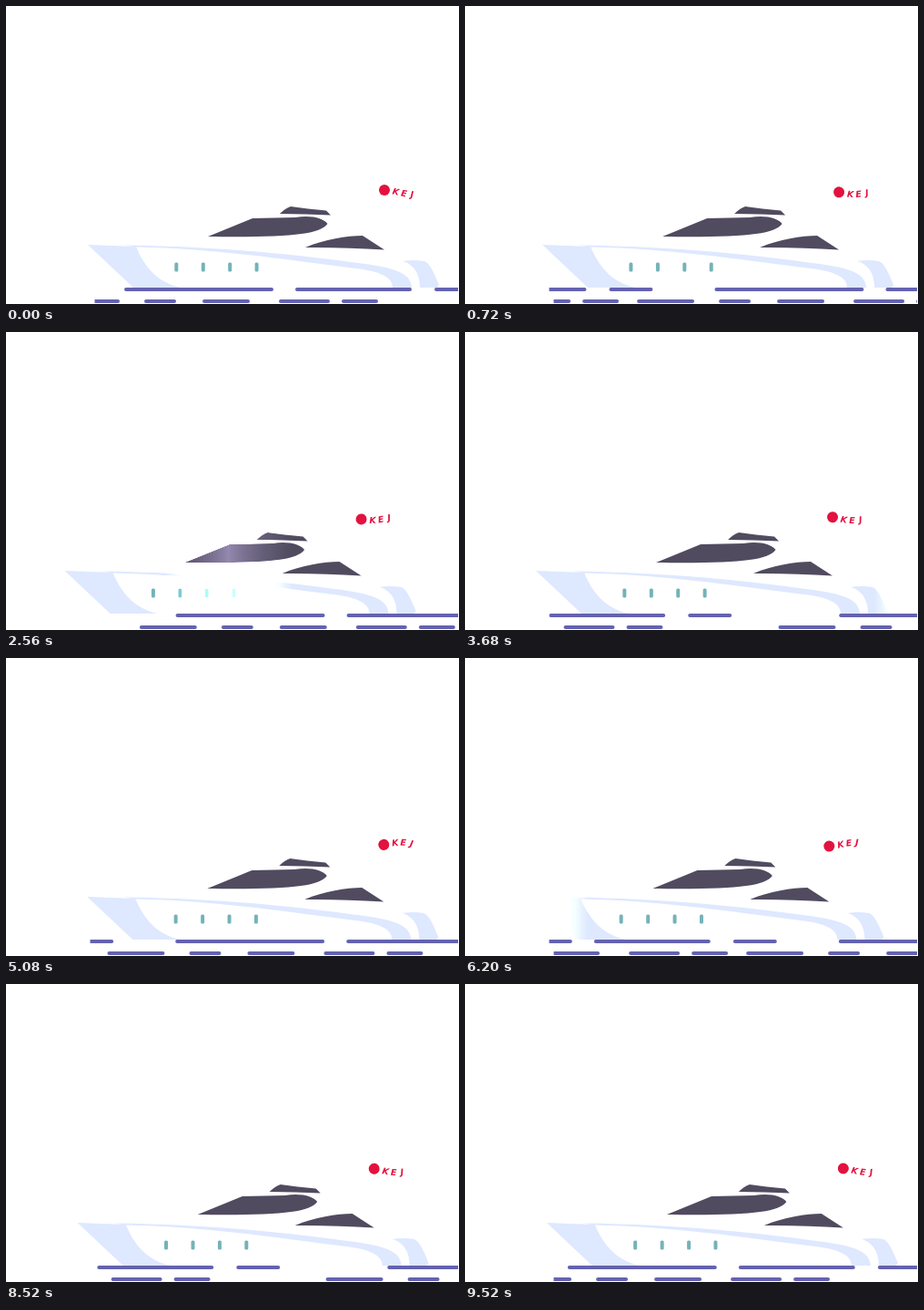
Recreate the animation shown at these times as an HTML page. Size 498 px wide and 327 px high, loop 9.56 s.

```html
<!DOCTYPE html>
<html lang="en">
<head>
<meta charset="utf-8">
<title>Yacht</title>
<style>
  html, body { margin: 0; width: 100%; height: 100%; overflow: hidden; background: #fff; }
  svg { display: block; width: 498px; height: 327px; }
  .scene { isolation: isolate; }
  .shine { mix-blend-mode: color-dodge; }
  .hull { fill: #dee8ff; }
  .glass { fill: #514b60; }
  .port { fill: #74b3b8; }
  .water { stroke: #6462b0; stroke-width: 4; stroke-linecap: round; }
  .flag { fill: #e3123f; font: italic bold 9.5px "DejaVu Sans", sans-serif; text-anchor: middle; }
</style>
</head>
<body>
<svg viewBox="0 0 498 327">
  <defs>
    <linearGradient id="glow">
      <stop offset="0" stop-color="#000"/>
      <stop offset=".5" stop-color="#737373"/>
      <stop offset="1" stop-color="#000"/>
    </linearGradient>
    <clipPath id="upperClip"><rect x="92.5" y="305" width="404.5" height="12"/></clipPath>
    <clipPath id="lowerClip"><rect x="97.5" y="317" width="399.5" height="10"/></clipPath>
  </defs>

  <g class="scene">
    <rect width="498" height="327" fill="#fff"/>
    <g id="boat">
      <g class="hull">
        <path d="M90 262 L143 264 C151 284 165 303 192 309 H140 Z"/>
        <path d="M130 262.5 C240 264 320 273 395 283 C430 288 445 294 446 309 H425 C425 297 410 291 385 288 C300 277 225 266 143 264.5 Z"/>
        <path d="M436 280 Q448 278 460 280 C467 283 471 295 476 306 L474 309 H455 C455 296 450 284 436 280 Z"/>
      </g>
      <g class="glass">
        <path d="M222 253 L271 233 L318 232 C336 229 349 233 353.5 239 C344 251 312 254 222 253 Z"/>
        <path d="M301 228 Q307 222 313 220 L332 222.5 L352 224.5 L357 229.5 Q330 228 301 228 Z"/>
        <path d="M329 265 C350 256 375 252 392 252 L416 267.5 Q370 264.5 329 265 Z"/>
      </g>
      <g class="port">
        <rect x="185.3" y="281.5" width="4" height="10" rx="1.5"/>
        <rect x="214.8" y="281.5" width="4" height="10" rx="1.5"/>
        <rect x="244.2" y="281.5" width="4" height="10" rx="1.5"/>
        <rect x="273.6" y="281.5" width="4" height="10" rx="1.5"/>
      </g>
    </g>
    <rect id="shine" class="shine" x="-70" y="210" width="140" height="105" fill="url(#glow)"/>
  </g>

  <g clip-path="url(#upperClip)"><g id="upper" class="water"></g></g>
  <g clip-path="url(#lowerClip)"><g id="lower" class="water"></g></g>

  <g id="flag" class="flag">
    <circle r="6" data-x="416"/>
    <text data-x="428.5" y="3.5">K</text>
    <text data-x="437.5" y="3.5">E</text>
    <text data-x="446.5" y="3.5">J</text>
  </g>
</svg>

<script>
  const LOOP = 9560, CYCLE = 4800, STEP = 40, WAVE = 960;
  const SVG = 'http://www.w3.org/2000/svg';
  const byId = id => document.getElementById(id);
  const move = (el, x, y = 0) => el.setAttribute('transform', `translate(${x} ${y})`);

  function addDashes(row, y, groups, dashes) {
    for (const start of groups) {
      for (const [from, to] of dashes) {
        const line = document.createElementNS(SVG, 'line');
        line.setAttribute('x1', start + from + 2);
        line.setAttribute('x2', start + to - 2);
        line.setAttribute('y1', y);
        line.setAttribute('y2', y);
        row.append(line);
      }
    }
  }

  const boat = byId('boat'), shine = byId('shine'), flag = byId('flag');
  const upper = byId('upper'), lower = byId('lower');
  addDashes(upper, 311, [130, -327, -834], [[0, 164], [188, 316], [341, 389]]);
  addDashes(lower, 324, [62, -305, -779], [[0, 63], [90, 125], [154, 206], [238, 294], [307, 347]]);

  // A ripple travels along the flag, away from the mark.
  function waveFlag(t, shift) {
    const k = Math.PI / 32;
    for (const part of flag.children) {
      const x = +part.dataset.x;
      const phase = k * (x - 416) - Math.PI / 2 - 2 * Math.PI * t / WAVE;
      const y = 204.3 + 2.2 * Math.sin(phase);
      const tilt = Math.atan(2.2 * k * Math.cos(phase)) * 180 / Math.PI;
      part.setAttribute('transform', `translate(${x + shift} ${y}) rotate(${tilt})`);
    }
  }

  function draw(now) {
    const time = Math.floor(now % LOOP / STEP) * STEP;
    const t = time % CYCLE;
    const shift = -12.8 * (1 - Math.cos(2 * Math.PI * (t - 30) / CYCLE));
    const sweep = t - 1400;
    move(boat, shift);
    move(shine, 65 + 0.1084 * sweep + 4e-5 * Math.max(sweep, 0) ** 2);
    move(upper, 0.2006 * t);
    move(lower, 0.1765 * t);
    waveFlag(t, shift);
  }

  const begin = performance.now();
  function tick() {
    draw(performance.now() - begin);
    requestAnimationFrame(tick);
  }
  tick();
</script>
</body>
</html>
```
